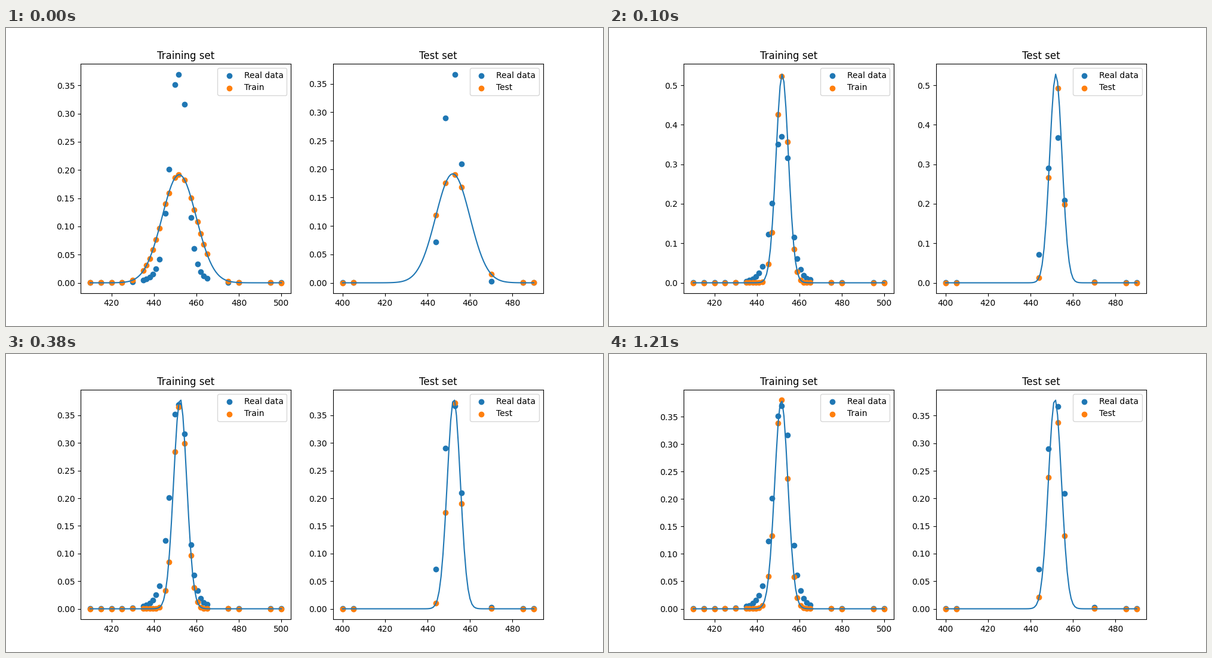
A matplotlib script for the animation above (1.68 s loop, 1000x500 px).

```python
import numpy as np
import matplotlib.pyplot as plt
from matplotlib.animation import FuncAnimation

STEP = 20      # ms per frame
LOOP = 1680    # ms per loop

# Each fit stage: start time (ms), peak height, centre, width
STAGES = [
    (0, 0.1918, 451.89, 8.05),
    (100, 0.5285, 451.918, 2.921),
    (200, 0.3801, 452.364, 3.096),
    (500, 0.3801, 451.492, 3.1015),
]
TEST_X = [400, 405, 444, 448.5, 453, 456, 470, 485, 490]


def bell(x, peak, centre, width):
    return peak * np.exp(-0.5 * ((x - centre) / width) ** 2)


def measured(x):
    """Skewed peak with long tails, sharper on the right."""
    d = x - 452.1
    left = (1 + np.abs(d / 6.365) ** 3) ** -1.467
    right = (1 + np.abs(d / 4.71) ** 3) ** -1.267
    return 0.3703 * np.where(d < 0, left, right)


def padded(*arrays):
    values = np.concatenate(arrays)
    low, high = values.min(), values.max()
    pad = 0.05 * (high - low)
    return low - pad, high + pad


class Panel:
    def __init__(self, ax, title, label, x):
        self.ax = ax
        self.x, self.y = x, measured(x)
        self.grid = np.linspace(x.min(), x.max(), 100)
        ax.scatter(x, self.y, label="Real data")
        self.dots = ax.scatter(x, self.y, label=label)
        self.curve, = ax.plot(self.grid, 0 * self.grid, color="C0")
        ax.set_xlim(padded(x))
        ax.set_title(title)
        ax.legend(loc="upper right")

    def show(self, params):
        fitted = bell(self.x, *params)
        line = bell(self.grid, *params)
        self.dots.set_offsets(np.column_stack([self.x, fitted]))
        self.curve.set_ydata(line)
        self.ax.set_ylim(padded(self.y, fitted, line))


# Samples are dense around the peak, sparse in the tails
all_x = np.concatenate([
    np.arange(400, 435, 5),
    np.arange(435, 465, 1.5),
    np.arange(465, 501, 5),
])
is_test = np.isin(all_x, TEST_X)

fig, axes = plt.subplots(1, 2, figsize=(10, 5), dpi=100)
panels = [
    Panel(axes[0], "Training set", "Train", all_x[~is_test]),
    Panel(axes[1], "Test set", "Test", all_x[is_test]),
]


def update(frame):
    now = frame * STEP
    params = [stage[1:] for stage in STAGES if stage[0] <= now][-1]
    for panel in panels:
        panel.show(params)


anim = FuncAnimation(fig, update, frames=LOOP // STEP, interval=STEP,
                     init_func=lambda: update(0), repeat=True)
plt.show()
```
